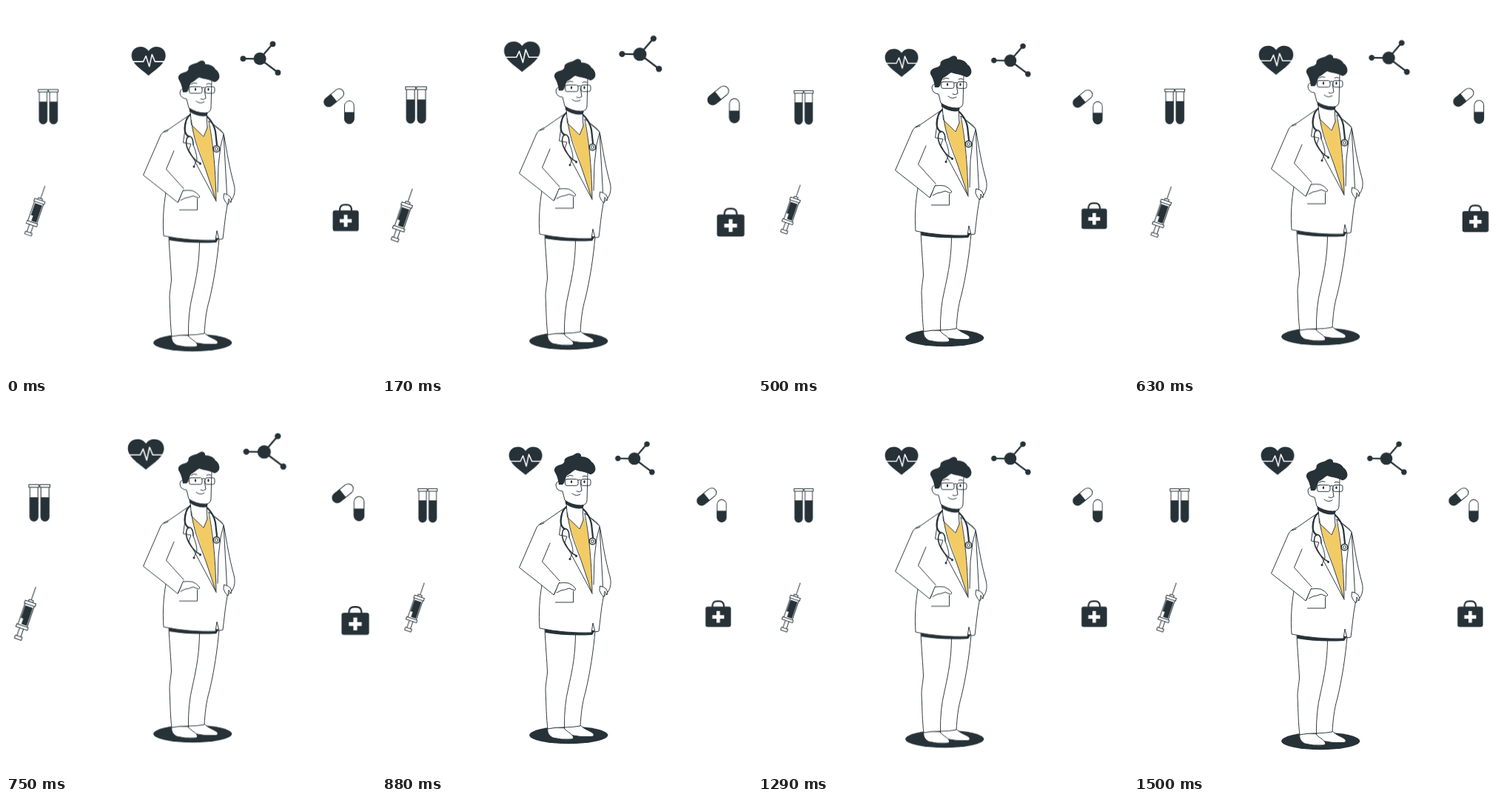
An HTML page without scripts for the animation above (1.54 s loop, 500x500 px).

```html
<!DOCTYPE html>
<html lang="en">
<head>
<meta charset="utf-8">
<title>Doctor</title>
<style>
  html, body { margin: 0; height: 100%; overflow: hidden; background: #fff; }
  svg { display: block; width: 100%; height: 100%; }
  .line { fill: none; stroke: #263238; stroke-width: .95; stroke-linecap: round; stroke-linejoin: round; }
  .paper { fill: #fff; }
  .ink { fill: #263238; }
  .amber { fill: #f2cb64; }
  .bold { stroke-width: 2.2; }
  .medium { stroke-width: 1.6; }

  #icons { transform-origin: 251px 178px; animation: beat 1540ms linear infinite; }
  #doctor { animation: float 1540ms linear infinite; }

  @keyframes beat {
    0% { transform: scale(1.0233); }
    7.65% { transform: scale(1.1); }
    27.6%, 37.5% { transform: scale(1); }
    47.5% { transform: scale(1.1); }
    57.2%, 100% { transform: scale(1); }
  }
  @keyframes float {
    0% { transform: translateY(-.47px); }
    47.5% { transform: translateY(-10px); }
    97.4%, 100% { transform: translateY(0); }
  }
</style>
</head>
<body>
<svg viewBox="0 0 500 500">
  <defs>
    <g id="tube">
      <path class="line paper" d="M-5 2V39.500a5 5 0 0 0 10 0V2z"/>
      <path class="ink" d="M-5.300 15H5.300V39.500a5.300 5.300 0 0 1-10.600 0z"/>
      <rect class="line paper" x="-6.200" y="-1" width="12.400" height="3.400"/>
    </g>
    <g id="pill">
      <rect class="line paper" x="-6.200" y="-15" width="12.400" height="30" rx="6.200"/>
      <path class="ink" d="M-6.500 0H6.500V9a6.500 6.500 0 0 1-13 0z"/>
    </g>
  </defs>

  <g id="icons">
    <use href="#tube" x="54.800" y="115.300"/>
    <use href="#tube" x="68.500" y="115.300"/>

    <path class="ink" d="M194 96C188 90 171.500 81 171.500 69.500C171.500 57 188 54 194 63.500C200 54 216.500 57 216.500 69.500C216.500 81 200 90 194 96z"/>
    <path d="M171 77.500H187L190.500 70L195 84L198.500 68L202.500 77.500H217" fill="none" stroke="#fff" stroke-width="1.500" stroke-linejoin="round"/>

    <path class="line bold" d="M319 73.500L341 73.800L358 54M341 73.800L365 92"/>
    <g class="ink">
      <circle cx="341" cy="73.800" r="8.300"/>
      <circle cx="358" cy="54.200" r="3.800"/>
      <circle cx="318.800" cy="73.500" r="3.800"/>
      <circle cx="364.800" cy="92" r="3.800"/>
    </g>

    <use href="#pill" transform="translate(438.800 125.200) rotate(51)"/>
    <use href="#pill" transform="translate(459 144.300)"/>

    <path class="line bold" d="M446.500 275V272.500Q447 266.500 453 266.500H455.500Q461.500 266.500 462 272.500V275"/>
    <rect class="ink" x="437.200" y="273.800" width="34.300" height="27.500" rx="3"/>
    <path d="M446.300 287.700H462.300M454.300 279.700V295.700" stroke="#fff" stroke-width="4.800"/>

    <g transform="translate(45 277) rotate(19)">
      <path class="line" d="M0-37V-18"/>
      <rect class="line paper" x="-2.500" y="16" width="5" height="12"/>
      <rect class="line paper" x="-4.500" y="27.500" width="9" height="3.800"/>
      <rect class="line paper" x="-6" y="-15" width="12" height="29"/>
      <path class="ink" d="M-5-11.500H5V12H-2V5H-5z"/>
      <rect class="line paper" x="-2.800" y="-20" width="5.600" height="3"/>
      <rect class="line paper" x="-7" y="-17.500" width="14" height="3.800"/>
      <rect class="line paper" x="-7.500" y="13.500" width="15" height="3.800"/>
    </g>
  </g>

  <g id="doctor">
    <ellipse class="ink" cx="252.200" cy="455.400" rx="53" ry="11.800"/>

    <!-- shoes and trousers -->
    <path class="line paper" d="M247 443C246 449 247 453 253 455Q268 458.500 283 457.500Q287 457 286 454C283 450 273 448 268 442z"/>
    <path class="line paper" d="M224 446C223 451 225 456 231 459Q242 462 255 461Q259 461 258.500 458C257 453 249 451 246 446z"/>
    <path class="paper" d="M220 312C221 335 223 355 223.500 371C222 384 221 388 221 395C222 417 222 432 224 447L246 445L268 443C269 428 270 414 275 397C281 372 286 340 288 314z"/>
    <path class="line" d="M220 312C221 335 223 355 223.500 371C222 384 221 388 221 395C222 417 222 432 224 447Q235 444.500 246 445Q258 445 268 443C269 428 270 414 275 397C281 372 286 340 288 314M261.500 316C261.500 350 256 372 252 391Q246 415 246.500 445"/>
    <path class="ink" d="M220 311L220.500 317Q250 322 284 320L288 314z"/>

    <!-- coat -->
    <path class="line paper" d="M276 157L290 168Q294 171 295 177C298 195 302 220 308 241Q311 252 306 261Q302 267 297 270L286 262z"/>
    <path class="line paper" d="M246 149L220 167Q212 169.500 209 175L185.500 229L216 253C213 270 211.500 290 213 311Q247 318 283 317L285 304L288 316L293 315C295 300 296 285 299 270L298 245L294 173L276 157z"/>
    <path class="line" d="M227 196L216.500 221L240 247M216 253L232 266L240 249M213 171L219 169"/>
    <path class="line" d="M258.500 261V276H234.500"/>
    <path class="line paper" d="M233 265L239 250Q246 249 252 250Q258 252 262 258Q261 261 258 259L253 257Q248 259 242 260L236 263"/>
    <path class="line paper" d="M295 254Q300 255 303 258Q306 262 304 266L301 261L300 269Q296 266 294 260z"/>

    <!-- neck, shirt and lapels -->
    <path class="paper" d="M247 149L284 264L288 200L273 155z"/>
    <path class="amber" d="M251 161L267 178L273.500 160C279 181 282 211 284 262L268 215C262 195 254 178 251 161z"/>
    <path class="line paper" d="M249 142L250.500 161L267 177L272 165L271 145"/>
    <path class="line" d="M250.500 155C253 181 263 202 270 222L284 264M244 152L239.500 185L250 187L247 195L284 264M274 156C279 181 283 215 284 262M294 174L290 190L287 216L286 252"/>

    <!-- stethoscope -->
    <path class="line bold" d="M249 147Q242 153 241.500 166Q241.500 174 247 177M272 150Q281 159 283 170L285 188"/>
    <path class="line medium" d="M263 213Q257 211 251 203Q243 192 243.500 184Q244 176 248.500 176.500Q253 178 253 188"/>
    <path class="line" d="M253 188Q258 200 258 208L254 217"/>
    <circle class="ink" cx="254" cy="217.500" r="1.500"/>
    <circle class="ink" cx="262.500" cy="213.500" r="1.500"/>
    <circle class="line medium paper" cx="284.500" cy="193.500" r="4.300"/>
    <circle class="line" cx="284.500" cy="193.500" r="2"/>

    <!-- head -->
    <path class="ink" d="M247 136L248 143Q259 151 271.500 149L273 144z"/>
    <path class="line paper" d="M245 108Q246 113 244 115Q236 110 235 117Q235 125 244 126L247 138Q257 145 269 145Q277 144.500 277 138L278 101L262 96z"/>
    <path class="ink" d="M239 117C238 109 236 104 233.500 100C231 95 236 91 241 90C245 89 247 87 246.500 83.500C249 78 257 79 261 75.500C266 72.500 270 76 269 79C276 79 281 82 283 86C288 89 290 96 287 100Q283 105 279 102C274 99 268 99.500 261 97C258 97 256 102 250 104Q247 110 246 115L244 117z"/>
    <path class="line" d="M240 108L248 110M250 106Q254 103 258 105M271 106Q274 104 277 106M265 111Q267 109.500 269 111M268 113L270 125Q267 128 263 126M257 129Q262 133.500 268 130"/>
    <rect class="line" x="247.500" y="109.500" width="17.500" height="8.800" rx="2.500"/>
    <rect class="line" x="269" y="109.500" width="13" height="8.800" rx="2.500"/>
    <ellipse class="ink" cx="256" cy="113" rx="1.200" ry="2"/>
    <ellipse class="ink" cx="273.500" cy="113" rx="1.200" ry="2"/>
  </g>
</svg>
</body>
</html>
```
